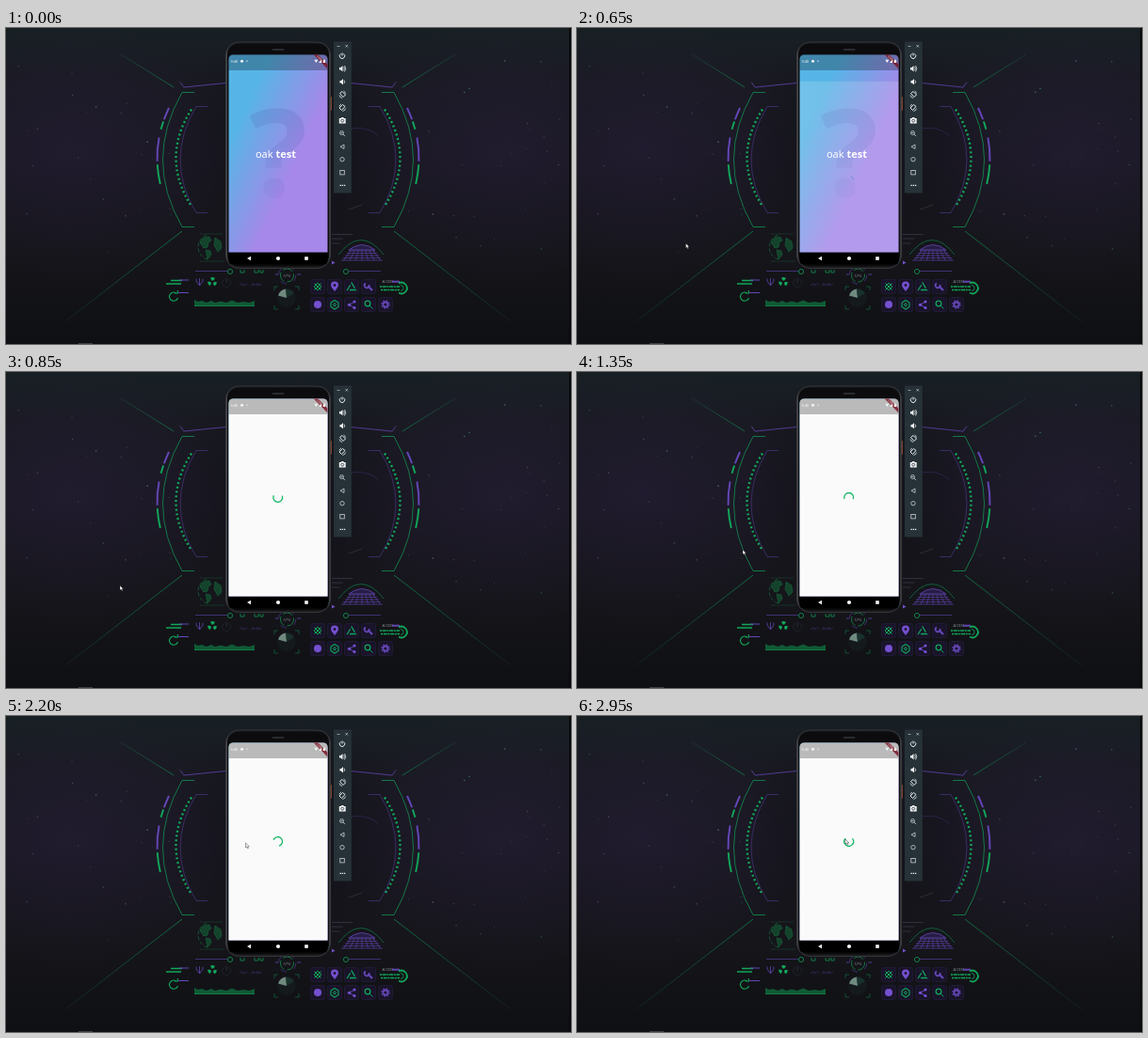
An HTML page for the animation above (3 s loop, 600 by 336 pixels).

```html
<!DOCTYPE html>
<html lang="en">
<head>
<meta charset="utf-8">
<style>
  html, body { margin: 0; width: 100%; height: 100%; overflow: hidden; background: #17171f; }
  svg { display: block; width: 600px; height: 336px; }
  text { font-family: "Noto Sans", "Open Sans", sans-serif; }
  .ln { fill: none; stroke-width: 1; }
  .g { stroke: #12a65a; } .p { stroke: #6547b8; }
  .gf { fill: #12b060; } .pf { fill: #7550d0; }
  .w { fill: none; stroke: #e8ecee; stroke-width: 1; }
  .wf { fill: #f2f4f5; }
</style>
</head>
<body>
<svg viewBox="0 0 600 336">
  <defs>
    <linearGradient id="sky" x2="0" y2="1">
      <stop offset="0" stop-color="#182024"/><stop offset=".15" stop-color="#191a22"/>
      <stop offset=".42" stop-color="#1a1822"/><stop offset=".72" stop-color="#15151a"/>
      <stop offset="1" stop-color="#0f1013"/>
    </linearGradient>
    <radialGradient id="haze">
      <stop offset="0" stop-color="#2c2044" stop-opacity=".35"/><stop offset="1" stop-color="#2c2044" stop-opacity="0"/>
    </radialGradient>
    <radialGradient id="core">
      <stop offset="0" stop-color="#0c0d12" stop-opacity=".6"/><stop offset="1" stop-color="#0c0d12" stop-opacity="0"/>
    </radialGradient>
    <linearGradient id="ray1" gradientUnits="userSpaceOnUse" x1="122" y1="28" x2="178" y2="63">
      <stop stop-color="#129a55" stop-opacity=".15"/><stop offset="1" stop-color="#129a55" stop-opacity=".6"/>
    </linearGradient>
    <linearGradient id="ray2" gradientUnits="userSpaceOnUse" x1="63" y1="312" x2="187" y2="216">
      <stop stop-color="#129a55" stop-opacity=".1"/><stop offset="1" stop-color="#129a55" stop-opacity=".65"/>
    </linearGradient>
    <linearGradient id="splash" gradientUnits="userSpaceOnUse" x1="241.5" y1="111" x2="336.5" y2="155">
      <stop stop-color="#56b5e6"/><stop offset=".695" stop-color="#a588e9"/>
    </linearGradient>
    <linearGradient id="mark" gradientUnits="userSpaceOnUse" x1="0" y1="84" x2="0" y2="180">
      <stop stop-color="#4650a8" stop-opacity=".18"/><stop offset="1" stop-color="#4650a8" stop-opacity=".07"/>
    </linearGradient>
    <linearGradient id="metal" x2="1">
      <stop stop-color="#515256"/><stop offset=".03" stop-color="#1c1d1f"/>
      <stop offset=".97" stop-color="#1c1d1f"/><stop offset="1" stop-color="#45464a"/>
    </linearGradient>
    <clipPath id="screen"><path d="M236.5 238.5V33.500Q236.5 28.500 241.5 28.500H336.5Q341.5 28.500 341.5 33.500V238.5Z"/></clipPath>

    <g id="side" class="ln">
      <path d="M122 28L178 63" stroke="url(#ray1)"/>
      <path d="M63 312L187 216" stroke="url(#ray2)"/>
      <path class="p" d="M185 57.500L189 63L233 58.500" opacity=".75"/>
      <path class="g" d="M200 68.500H187Q146 140 187 211.500H200" stroke-width=".9" opacity=".75"/>
      <path class="p" d="M173 85Q148 138 173 192" pathLength="100" stroke-width="1.900" stroke-dasharray="12 18 23 47"/>
      <path class="g" d="M173 85Q148 138 173 192" pathLength="100" stroke-width="1.900" stroke-dasharray="0 14 8 34 19 25"/>
      <path class="g" d="M197 86.500Q164 138 197 189.500" stroke-width="2.400" stroke-dasharray="2 2.800"/>
      <path class="p" d="M214 83.500H202Q168 140 202 196.500H214" stroke-width=".8" opacity=".55"/>
      <path class="p" d="M201 258.500H235" stroke-width=".8" opacity=".7"/>
      <circle class="g" cx="238" cy="259" r="2.600" stroke-width=".9" opacity=".8"/>
    </g>
  </defs>

  <rect width="600" height="336" fill="url(#sky)"/>
  <ellipse cx="70" cy="130" rx="170" ry="140" fill="url(#haze)"/>
  <ellipse cx="530" cy="130" rx="170" ry="140" fill="url(#haze)"/>
  <ellipse cx="300" cy="130" rx="140" ry="130" fill="url(#core)"/>
  <path class="ln" d="M366 107Q383 104 395 114" stroke="#34275a" opacity=".7"/>
  <path class="ln" d="M364 193L378 188" stroke="#3c3f46" opacity=".6"/>
  <g id="stars"></g>
  <use href="#side"/>
  <use href="#side" transform="translate(599 0) scale(-1 1)"/>
  <path class="ln g" d="M249 257V260H253V257M264 257V260H268V257M270 257V260H273V257" stroke-width=".8" opacity=".7"/>
  <path class="pf" d="M346 247.500L349.500 249.500L346 251.500Z"/>
  <path d="M77 335.500H92" stroke="#4a4d50" stroke-width=".8"/>
  <path d="M599 0V336" stroke="#08090b" stroke-width="2"/>

  <!-- globe -->
  <g class="ln" stroke="#14713f" stroke-width=".7">
    <path d="M214 246A13.500 13.500 0 0 1 214 220" stroke-dasharray="4 2" opacity=".7"/>
    <path d="M206 228l4-5 6-1 2 4-3 2-1 5-4 1zM212 236l5 1 1 4-4 5zM222 223l6 4 1 7-4 4-4-7z" fill="#146a3d" fill-opacity=".55" stroke-dasharray="1 1"/>
    <path d="M206 219H230M206 248H232" opacity=".3"/>
  </g>
  <!-- dome -->
  <g class="ln p" stroke-width=".7">
    <path d="M353 241Q377 210 401 241" class="g" opacity=".5"/>
    <path d="M364 236Q378 225 392 236Z" fill="#2c2050" opacity=".8"/>
    <path id="grid" opacity=".6"/>
    <path d="M346 219.500H368M346 224H358M346 229H354" stroke="#4c4e60" opacity=".5"/>
  </g>
  <!-- gauge -->
  <g class="ln" opacity=".75">
    <circle class="g" cx="298.500" cy="263" r="7" stroke-dasharray="11 3" stroke-width=".9"/>
    <circle class="p" cx="298.500" cy="263" r="9.300" stroke-dasharray="7 8" stroke-width=".7"/>
    <path class="p" d="M286 262H289M309 262H313"/>
    <text x="298.500" y="264.500" font-size="4" text-anchor="middle" fill="#9fb0b3">57%</text>
  </g>
  <!-- left panel -->
  <g class="ln">
    <path class="g" d="M175 268.500H187M170 272H186" stroke-width="1.700"/>
    <path class="p" d="M184 268H194M183 281.500H194"/>
    <path class="g" d="M181.500 282.500A4.600 4.600 0 1 0 182.500 287M178.800 282H182.300V279" stroke-width="1.100"/>
    <path class="p" d="M202 266.500V269L205.500 274L209 269V266.500M205.500 266V273" stroke-width=".9" opacity=".85"/>
    <circle class="g" cx="219" cy="270" r="3.300" stroke-width="3.200" stroke-dasharray="3.456"/>
    <circle cx="234" cy="271" r="4.500" stroke="#1f2129"/><path d="M234 267V271" stroke="#282b33"/>
    <text x="247" y="273.500" font-size="4" fill="#46367a">-:0o1 --:0o0ol</text>
    <path d="M200 295.500V289L204 291 208 290 213 292 218 290 222 292 228 290.500 234 292 240 289.500 246 292 252 291 258 292 264 290V295.500Z" fill="#0f5a35"/>
    <path class="g" d="M200 295.500H264" stroke-width=".8" opacity=".8"/>
  </g>
  <!-- radar -->
  <g class="ln">
    <circle cx="298" cy="287" r="10" fill="#14191b"/>
    <path d="M298 287L289 284.500A10 10 0 0 1 297 277.500Z" fill="#8fb0a2" opacity=".75"/>
    <path d="M298 287L297 277.500A10 10 0 0 1 306 282Z" fill="#1d4038" opacity=".6"/>
    <path class="g" d="M285 279V275H289M307 275H311V279M311 295V299H307M289 299H285V295" stroke-width=".7" opacity=".6"/>
  </g>
  <!-- tiles -->
  <g id="tiles"></g>
  <g class="ln" stroke-width="1.600">
    <path class="g" d="M327.500 271.500L334.500 278.500M334.500 271.500L327.500 278.500"/>
    <path class="g" d="M331 271L335 275L331 279L327 275Z" stroke-width=".9"/>
    <path class="pf" d="M349 280Q345 275 345 273.500A4 4 0 0 1 353 273.500Q353 275 349 280Z"/>
    <circle cx="349" cy="273.500" r="1.400" fill="#1b1629"/>
    <path class="g" d="M367 271L371.500 278.500H362.500Z" stroke-width="1.300" stroke-dasharray="6.500 2.200"/>
    <path class="p" d="M384.500 274.500L389 279" stroke-width="2.200"/>
    <path class="p" d="M382 271.500A2.500 2.500 0 1 0 385.500 273" stroke-width="1.800"/>
    <circle class="pf" cx="331" cy="294" r="4"/>
    <path class="g" d="M349 289.500L353 292V296.500L349 299L345 296.500V292Z" stroke-width="1.100"/>
    <circle class="g" cx="349" cy="294.300" r="1.400" stroke-width="1"/>
    <path class="p" d="M370 291L364.500 294.300L370 297.500" stroke-width="1"/>
    <g class="pf"><circle cx="370" cy="291" r="1.600"/><circle cx="364.500" cy="294.300" r="1.600"/><circle cx="370" cy="297.500" r="1.600"/></g>
    <circle class="g" cx="384" cy="293" r="2.800" stroke-width="1.300"/><path class="g" d="M386 295L389.500 298.500"/>
    <circle class="p" cx="403" cy="294" r="2.500" stroke-width="1.800"/>
    <circle class="p" cx="403" cy="294" r="4" stroke-dasharray="1.600 1.540" stroke-width="1.400"/>
  </g>
  <!-- right readout -->
  <g class="ln">
    <text x="399.500" y="271.200" font-size="3.400" fill="#8d999e">ACCESS</text>
    <path class="p" d="M410 269.700H418" stroke-width="1.900"/>
    <path class="g" d="M397 275H418M398 278.500H418" stroke-dasharray="2 .7 4 .7" stroke-width="1.300"/>
    <path class="g" d="M417 271.500A5.800 5.800 0 1 1 417 281.500" stroke-width="1.800"/>
    <path class="g" d="M419 273.500A3 3 0 0 1 419 279.500" stroke-width=".8"/>
  </g>

  <!-- phone -->
  <rect x="344" y="73" width="1.800" height="15" rx=".9" fill="#94502f"/>
  <rect x="233.500" y="15" width="111" height="240.500" rx="14" fill="url(#metal)" stroke="#3d3e42" stroke-width=".8"/>
  <rect x="235" y="16.500" width="108" height="237" rx="12" fill="#0c0c0e"/>
  <rect x="282.500" y="22" width="13" height="2" rx="1" fill="#2a2b2f"/>
  <path d="M236.500 238.500H341.500V247Q341.500 251.500 337 251.500H241Q236.500 251.500 236.500 247Z" fill="#000"/>
  <path class="wf" d="M256 245L260 242.700V247.300Z"/><circle class="wf" cx="289" cy="245" r="2.100"/>
  <rect class="wf" x="317.200" y="243.200" width="3.600" height="3.600"/>

  <g clip-path="url(#screen)">
    <rect x="236" y="28" width="106" height="211" fill="url(#splash)"/>
    <text x="289" y="179" font-size="130" font-weight="700" text-anchor="middle" fill="url(#mark)">?</text>
    <text x="286.500" y="138" font-size="11" text-anchor="middle" fill="#fff">oak <tspan font-weight="700">test</tspan></text>
    <g id="page">
      <rect x="236" y="28" width="106" height="212" fill="#fafafa"/>
      <path id="arc" fill="none" stroke="#16b765" stroke-width="1.300" stroke-linecap="square"/>
    </g>
    <rect x="236" y="28" width="106" height="17" fill="#000" opacity=".26"/>
    <path d="M326.400 28H331L341.500 38.800V43.500Z" fill="#7d1424" opacity=".85"/>
    <text transform="translate(330 30.600) rotate(45)" font-size="2.700" font-weight="700" fill="#c9a5a8">DEBUG</text>
    <text x="238.500" y="36.700" font-size="3.800" fill="#fff">9:40</text>
    <circle class="wf" cx="250.500" cy="35.200" r="1.500"/><circle class="wf" cx="256" cy="35.200" r=".7"/>
    <path class="wf" d="M327.300 33.800H331.300L329.300 36.900ZM335 33.500V37H332ZM337 33.700H339V37H337Z"/>
  </g>

  <!-- toolbar -->
  <rect x="348" y="14.500" width="18.800" height="161" fill="#263238"/>
  <g class="w">
    <path d="M351.500 19.500H354.500M360.500 18L363 20.500M363 18L360.500 20.500" stroke-width=".7" opacity=".8"/>
    <path d="M355.500 27.500A2.700 2.700 0 1 0 358.500 27.500M357 26.500V29.500"/>
    <path class="wf" d="M354 42H355.500L357.500 40V46.500L355.500 44.500H354Z" stroke="none"/>
    <path d="M358.700 41.300Q360 43.200 358.700 45.200M359.500 40Q362 43.200 359.500 46.500" stroke-width=".8"/>
    <path class="wf" d="M354.500 56H356L358 54V60.500L356 58.500H354.500Z" stroke="none"/>
    <path d="M359 55.500Q360.300 57.200 359 59" stroke-width=".8"/>
    <g id="turn"><path d="M354.500 69.500L357 67.500L360.500 71L358 73.500Z"/><path d="M354 71.500Q354.500 74 357 74.500M360.500 69.500Q360 67.500 358.500 67" stroke-width=".8"/></g>
    <use href="#turn" transform="translate(714.500 14) scale(-1 1)"/>
    <path class="wf" d="M353.800 96H355.500L356.200 95H358.200L359 96H360.700V101.500H353.800Z" stroke="none"/>
    <circle cx="357.200" cy="98.600" r="1.500" stroke="#263238" stroke-width=".8"/>
    <g stroke-width=".8" opacity=".85">
      <circle cx="356.500" cy="111.500" r="2"/><path d="M358 113L360 115M355.500 111.500H357.500"/>
      <path d="M355 126.200L359 124V128.400Z"/>
      <circle cx="357" cy="139.700" r="2.200"/>
      <rect x="354.800" y="151.400" width="4.500" height="4.500"/>
    </g>
    <path d="M354.500 167.300H360.500" stroke-width="1.300" stroke-dasharray="1.400 .8"/>
  </g>

  <path id="cursor" d="M0 0V5L1.200 4L2.100 5.900L2.900 5.500L2.100 3.700H3.700Z" fill="#fff" stroke="#111" stroke-width=".4"/>
</svg>
<script>
const LOOP = 3000, STEP = 50;
const $ = id => document.getElementById(id);
const clamp = v => Math.min(1, Math.max(0, v));

// CSS-style cubic bezier, solved by bisection
function bezier(x1, y1, x2, y2) {
  const at = (a, b, s) => 3 * a * s * (1 - s) ** 2 + 3 * b * s * s * (1 - s) + s ** 3;
  return x => {
    if (x <= 0 || x >= 1) return clamp(x);
    let lo = 0, hi = 1;
    for (let i = 0; i < 24; i++) {
      const mid = (lo + hi) / 2;
      if (at(x1, x2, mid) < x) lo = mid; else hi = mid;
    }
    return at(y1, y2, lo);
  };
}
const smooth = bezier(.4, 0, .2, 1), easeIn = bezier(.42, 0, 1, 1);

// static repeats
let seed = 11;
const rnd = () => (seed = (seed * 16807) % 2147483647) / 2147483647;
let stars = '';
for (let i = 0; i < 56; i++) {
  const x = rnd() * 170 + (i % 2 ? 425 : 5), y = 30 + rnd() * 210;
  stars += `<circle cx="${x}" cy="${y}" r="${.4 + rnd() * .5}" fill="${i % 3 ? '#5c5078' : '#34705c'}" opacity="${.4 + rnd() * .6}"/>`;
}
$('stars').innerHTML = stars;

let tiles = '';
for (let i = 0; i < 9; i++) {
  const x = 323.5 + (i < 4 ? i : i - 4) * 18, y = i < 4 ? 267.5 : 286.5;
  tiles += `<rect x="${x}" y="${y}" width="15" height="15" rx="2" fill="#19142a" stroke="#261d3c" stroke-width=".7"/>`;
}
$('tiles').innerHTML = tiles;

let grid = '';
for (let i = 0; i < 5; i++) grid += `M${364 - i * 2} ${237 + i * 2.5}H${392 + i * 2}`;
for (let i = -3; i <= 3; i++) grid += `M${378 + i * 4} 237L${378 + i * 6.5} 247`;
$('grid').setAttribute('d', grid);

// cursor stops: time, x, y
const stops = [[50, 111, 241], [400, 112, 239], [750, 117, 225], [850, 121, 227],
  [1850, 231, 151], [2550, 278, 119], [2950, 285, 131]];
function cursorAt(t) {
  let i = 0;
  while (i < stops.length - 2 && t > stops[i + 1][0]) i++;
  const [a, b] = [stops[i], stops[i + 1]];
  const k = clamp((t - a[0]) / (b[0] - a[0]));
  return [a[1] + (b[1] - a[1]) * k, a[2] + (b[2] - a[2]) * k];
}

function arcPath(ms) {
  const turn = 2 * Math.PI, u = (ms / 1333) % 1;
  const head = smooth(clamp(u * 2)), tail = smooth(clamp(u * 2 - 1));
  const from = -turn / 4 + tail * turn * .75 + ms / 2222 * turn + u * turn / 4;
  const sweep = Math.max((head - tail) * turn * .75, .02);
  const point = a => `${288.7 + 4.9 * Math.cos(a)} ${133.4 + 4.9 * Math.sin(a)}`;
  return `M${point(from)}A4.9 4.9 0 ${sweep > Math.PI ? 1 : 0} 1 ${point(from + sweep)}`;
}

function draw(now) {
  const t = Math.floor((now % LOOP) / STEP) * STEP;
  const enter = clamp((t - 550) / 300);
  $('page').setAttribute('opacity', easeIn(enter));
  $('page').setAttribute('transform', `translate(0 ${(1 - smooth(enter)) * 53})`);
  // the spinner lags near the end of the loop
  const spin = Math.min(t, 2550) + Math.max(0, t - 2550) * .18 - 512;
  $('arc').setAttribute('d', arcPath(Math.max(0, spin)));

  const [x, y] = cursorAt(t), overEdge = x > 228 && x < 236;
  $('cursor').setAttribute('transform', `translate(${x} ${y})`);
  $('cursor').setAttribute('opacity', t < 50 ? 0 : overEdge ? .25 : 1);
}
function tick() {
  draw(performance.now());
  requestAnimationFrame(tick);
}
tick();
</script>
</body>
</html>
```
